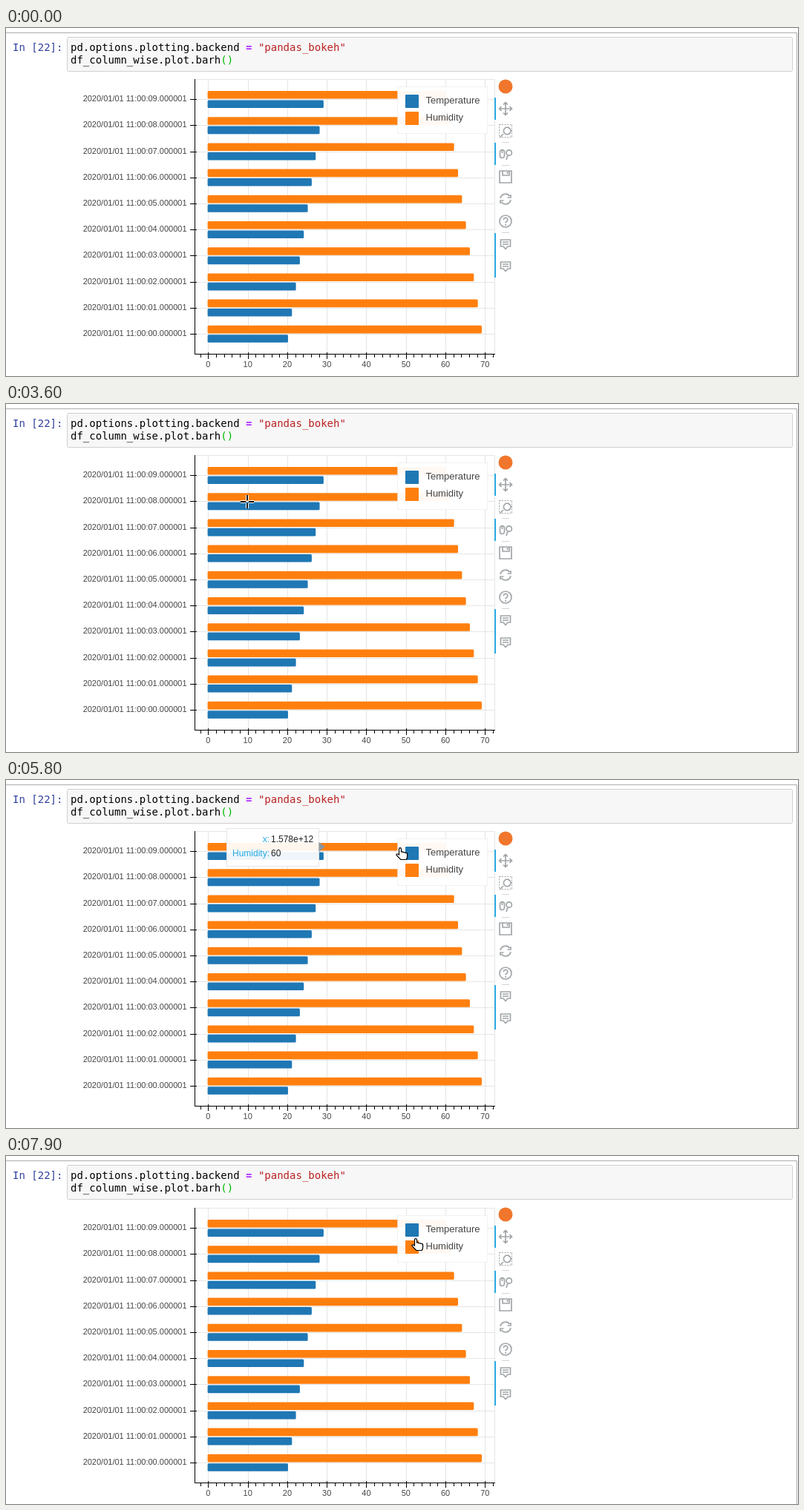
An HTML page for the animation above (8 s loop, 1067 by 470 pixels).

```html
<!DOCTYPE html>
<html lang="en">
<head>
<meta charset="utf-8">
<title>Horizontal bar plot</title>
<style>
html, body { margin: 0; width: 100%; height: 100%; overflow: hidden; background: #fff; }
svg { display: block; }
text { white-space: pre; font-family: "Liberation Sans", Arial, sans-serif; fill: #444; }
.code { font: 14px "DejaVu Sans Mono", monospace; fill: #000; }
.axis { font-size: 11px; }
.legend { font-size: 13px; }
.tip { font-size: 12px; fill: #222; }
.end { text-anchor: end; }
.mid { text-anchor: middle; }
.grid { stroke: #e5e5e5; fill: none; }
.tick { stroke: #000; fill: none; }
.icon { stroke: #a1a6a9; stroke-width: 1.7; fill: none; }
</style>
</head>
<body>
<svg width="1067" height="470" viewBox="0 0 1067 470">
  <path d="M0 6.5H1065.5V470" fill="none" stroke="#ababab"/>
  <rect x="82.5" y="12.5" width="977" height="46" rx="2" fill="#f7f7f7" stroke="#cfcfcf"/>
  <text class="code" x="9" y="31" style="fill:#303f9f">In [22]:</text>
  <text class="code" x="87" y="31">pd.options.plotting.backend <tspan fill="#a2f" font-weight="bold">=</tspan> <tspan fill="#ba2121">"pandas_bokeh"</tspan></text>
  <text class="code" x="87" y="48">df_column_wise.plot.barh<tspan fill="#0b0">()</tspan></text>
  <g id="chart"></g>
  <g id="toolbar"></g>
  <g id="hover"></g>
</svg>
<script>
const X0 = 272.4, UNIT = 5.327, ROW = 35.2, BLUE = '#1f77b4', ORANGE = '#ff7f0e';
const SERIES = [
  { name: 'Humidity', color: ORANGE, dy: -5.8, value: i => 60 + i },
  { name: 'Temperature', color: BLUE, dy: 6.6, value: i => 29 - i },
];
const rowY = i => 96.1 + ROW * i;
const rows = [...Array(10).keys()];
const el = id => document.getElementById(id);
const path = (cls, d) => `<path class="${cls}" d="${d}"/>`;
const text = (cls, x, y, s, extra = '') => `<text class="${cls}" x="${x}" y="${y}" ${extra}>${s}</text>`;
const rect = (x, y, w, h, fill, extra = '') =>
  `<rect x="${x}" y="${y}" width="${w}" height="${h}" fill="${fill}" ${extra}/>`;

function bars(s) {
  return rows.map(i =>
    rect(271.6, rowY(i) + s.dy - 5.3, s.value(i) * UNIT + 1.8, 10.6, s.color, 'rx="1.5"')).join('');
}

function drawChart(showTemperature, shift) {
  let grid = 'M254.5 69.5H658.5V440.5H254.5Z', ticks = 'M254.5 69V441M254 440.5H659', labels = '';
  for (let v = -2; v <= 72; v += 2) {
    const x = Math.round(X0 + v * UNIT) + .5;
    if (v % 10) { ticks += `M${x} 440V445`; continue; }
    grid += `M${x} 70V440`;
    ticks += `M${x} 438V447`;
    labels += text('axis mid', X0 + v * UNIT, 458, v);
  }
  for (const i of rows) {
    const y = Math.round(rowY(i));
    grid += `M255 ${y + .5}H658`;
    ticks += `M248 ${y + .5}H257`;
    labels += text('axis end', 243.5, y + 3, `2020/01/01 11:00:0${9 - i}.000001`);
  }
  el('chart').setAttribute('transform', `translate(0 ${shift})`);
  el('chart').innerHTML = path('grid', grid) + bars(SERIES[0]) + (showTemperature ? bars(SERIES[1]) : '') +
    path('tick', ticks) + labels +
    rect(527.5, 79.5, 121, 63, '#fff', 'fill-opacity=".95" stroke="#e5e5e5" stroke-opacity=".5"') +
    rect(538, 90, 18, 18, BLUE, 'rx="1"') + text('legend', 565.5, 102, 'Temperature') +
    rect(538, 113, 18, 18, ORANGE, 'rx="1"') + text('legend', 565.5, 125, 'Humidity') +
    (showTemperature ? '' : rect(537, 88, 102, 22, '#fff', 'opacity=".7"'));
}

function drawToolbar() {
  const at = (y, d) => `<path class="icon" transform="translate(673 ${y})" d="${d}"/>`;
  const note = 'M-6.5-6H6.5V3H3L0 6.5L-3 3H-6.5ZM-4-3H4M-4 0H4';
  el('toolbar').innerHTML =
    '<circle cx="673" cy="79" r="9.5" fill="#f0762b"/>' +
    at(109, 'M-8 0H8M0-8V8M-5.5-3L-8.5 0L-5.5 3M5.5-3L8.5 0L5.5 3M-3-5.5L0-8.5L3-5.5M-3 5.5L0 8.5L3 5.5') +
    '<rect class="icon" x="664.5" y="130.5" width="17" height="17" style="stroke-width:1;stroke-dasharray:2 1.5"/>' +
    at(139, 'M-3 4L-7.5 8.5M-2.5 1A4.8 4.8 0 1 1 0 4.2A4.8 4.8 0 0 1-2.5 1') +
    at(170, 'M-7.5-2.5a3 3 0 0 1 6 0V2.5a3 3 0 0 1-6 0ZM-4.5-5V-1M1-1.5a3.7 3.7 0 1 1 7.4 0a3.7 3.7 0 1 1-7.4 0M3 2L1 8') +
    at(201, 'M-8-8H8V8H-8ZM-4-8V-2H5V-8M2.5-7V-4') +
    at(231, 'M-7-1A7 7 0 0 1 5.5-4M7 1A7 7 0 0 1-5.5 4M7-6V-2H2.5M-7 6V2H-2.5') +
    at(261, 'M-8 0a8 8 0 1 1 16 0a8 8 0 1 1-16 0M-2.8-2a2.8 2.6 0 1 1 4.3 2.2Q0 1 0 2.4M0 4V6') +
    at(292, note) + at(322, note) +
    '<path d="M668 154.5h10M668 185.5h10M668 276.5h10" stroke="#d3d3d3"/>' +
    '<path d="M659 94V124M659 155V185M659 277V337" stroke="#26aae1" stroke-width="2"/>';
}

function tooltip(x, y) {
  for (const s of SERIES) for (const i of rows) {
    const cy = rowY(i) + s.dy, length = s.value(i) * UNIT;
    if (Math.abs(y - cy) > 5.2 || x < X0 || x > X0 + length) continue;
    const anchor = X0 + length / 2, onLeft = s === SERIES[0];
    const width = onLeft ? 124 : 144, labelWidth = onLeft ? 50 : 70;
    const left = Math.round(onLeft ? anchor - 135 : anchor + 12) + .5, top = Math.round(cy - 25.5) + .5;
    const edge = onLeft ? left + width : left, tip = edge + (onLeft ? 8.5 : -8.5);
    const colon = left + 7.5 + labelWidth, blue = 'style="fill:#26aae1"';
    return rect(left, top, width, 51, '#fff', 'fill-opacity=".93" stroke="#e5e5e5"') +
      `<path d="M${edge} ${cy - 6.5}L${tip} ${cy}L${edge} ${cy + 6.5}Z" fill="#909599"/>` +
      text('tip end', colon, top + 18.5, 'x:', blue) + text('tip', colon + 2, top + 18.5, '1.578e+12') +
      text('tip end', colon, top + 37.5, s.name + ':', blue) + text('tip', colon + 2, top + 37.5, s.value(i));
  }
  return '';
}

const outlined = d => `<path d="${d}" fill="none" stroke="#fff" stroke-width="4"/>` +
  `<path d="${d}" fill="none" stroke="#000" stroke-width="1.8"/>`;
const solid = (d, fill, stroke) => `<path d="${d}" fill="${fill}" stroke="${stroke}" stroke-width="1.2"/>`;
const CURSORS = {
  arrow: solid('M0 0V14L3.3 11L5.6 16L8 15L5.7 10H10Z', '#000', '#fff'),
  beam: outlined('M-3-7.5H3M0-7.5V7.5M-3 7.5H3'),
  cross: outlined('M-9 0H-2M2 0H9M0-9V-2M0 2V9'),
  hand: `<g transform="translate(-5 -3)">${solid('M4.5 10V2.3Q4.5.7 6 .7T7.5 2.3V6Q9.7 5.4 10.1 6.7Q12.1 6.1 12.6 7.4Q15.6 7.1 15.6 9V12Q15.6 15 14.1 16.5H6.8L1 10.4Q.6 8.6 2.6 9Z', '#fff', '#000')}</g>`,
};
function cursorKind(x, y) {
  if (x > 527) return 'hand';
  if (y > 69) return 'cross';
  return y > 12 && y < 58 ? 'beam' : 'arrow';
}

// Pointer runs: start time, then one x,y per 100 ms; the last point holds.
const RUNS = [
  [400, 153, 2, 190, 22, 235, 45, 275, 70, 303, 83, 313, 89, 315, 91],
  [1300, 314, 96.6, 315, 93, 315, 91],
  [1800, 315, 96.6, 315, 100, 315, 102],
  [2300, 315, 96.6, 315, 104],
  [3000, 316, 114, 319, 123, 320, 125],
  [3600, 325, 132, 326, 136, 327, 138],
  [4200, 328, 147, 329, 153, 330, 158, 330, 160],
  [4900, 331, 167, 333, 172, 333, 172],
  [5400, 352, 154, 405, 149, 455, 115, 505, 95, 530, 94, 543, 98, 552, 101, 556, 102],
  [6400, 557, 101],
  [6700, 550, 99, 545, 97],
  [7100, 549, 98, 553, 99],
  [7600, 553, 103, 552, 108, 551, 112, 551, 114],
];

function pointer(t) {
  const run = RUNS.filter(r => r[0] <= t).pop();
  if (!run) return null;
  const k = Math.min((t - run[0]) / 100, (run.length - 3) / 2);
  return [run[1 + 2 * k], run[2 + 2 * k]];
}

let chartState = '', lastStep = -1;
function frame(now) {
  const t = Math.floor(now % 8000 / 100) * 100;
  if (t !== lastStep) {
    lastStep = t;
    const showTemperature = t < 6700 || t >= 7400;
    const shift = t >= 6700 && (t < 7400 || t >= 7600) ? 1 : 0;
    const state = `${showTemperature},${shift}`;
    if (state !== chartState) drawChart(showTemperature, shift);
    chartState = state;
    const p = pointer(t);
    el('hover').innerHTML = p
      ? tooltip(p[0], p[1] - shift) + `<g transform="translate(${p})">${CURSORS[cursorKind(...p)]}</g>` : '';
  }
  requestAnimationFrame(frame);
}

drawToolbar();
const start = performance.now();
requestAnimationFrame(function loop(now) { frame(Math.max(0, now - start)); });
</script>
</body>
</html>
```
